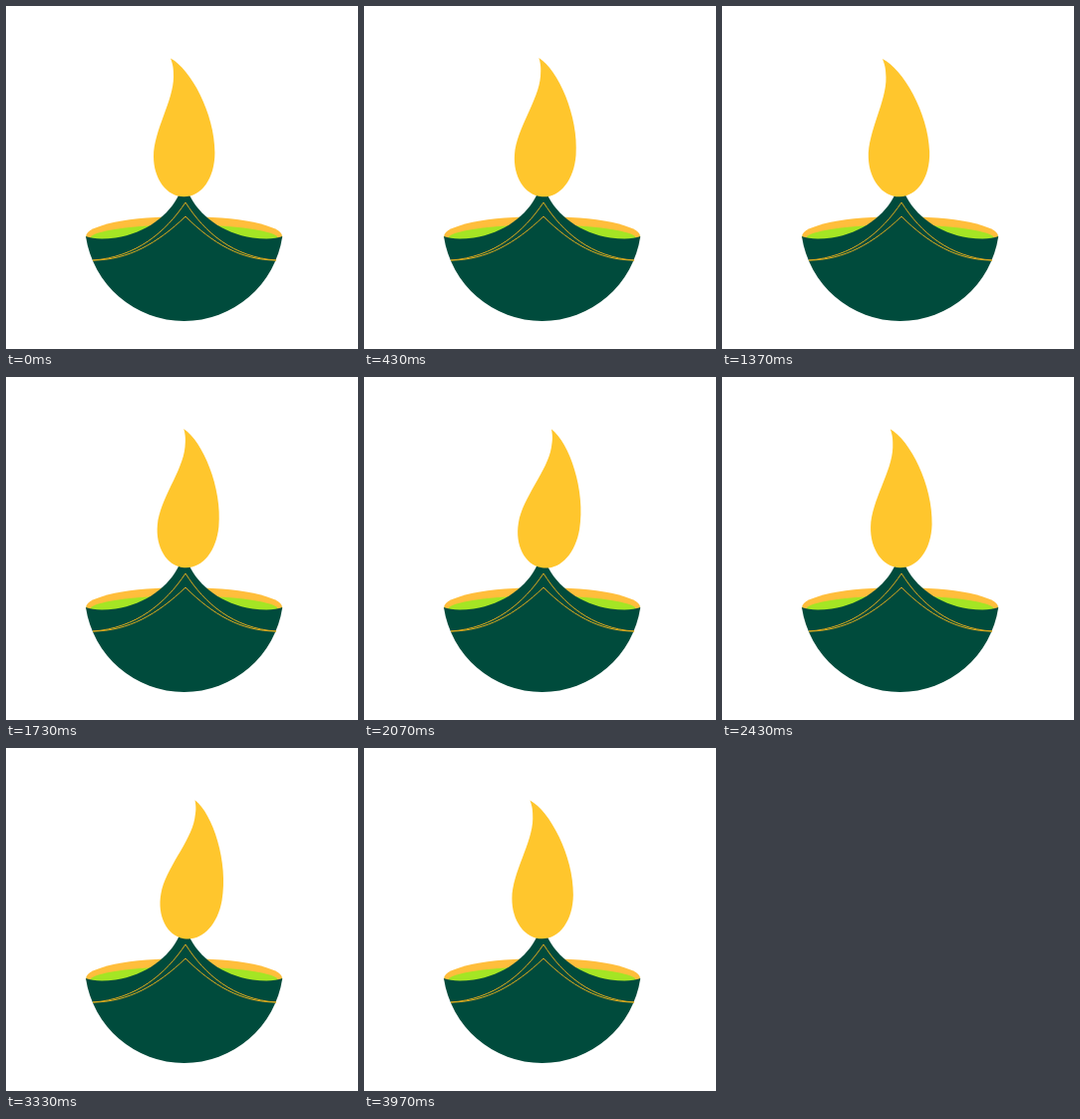
An HTML page with a canvas that plays this animation: 353 px wide and 344 px high, repeating every 4.01 s.

```html
<!DOCTYPE html>
<html lang="en">
<head>
<meta charset="utf-8">
<title>Oil lamp</title>
<style>
  html, body { margin: 0; width: 100%; height: 100%; overflow: hidden; background: #fff; }
  canvas { display: block; }
</style>
</head>
<body>
<canvas id="stage" width="353" height="344"></canvas>
<script>
const ctx = document.getElementById('stage').getContext('2d');
const LOOP = 4010;
const AXIS = 178.6;
const PIVOT = { x: 179, y: 190 };

// Flame tilt in degrees at evenly spaced moments of the loop.
const TILTS = [0, 6.7, -2.4, 11, -3.8, 10.4];

const flame = new Path2D(
  'M165 52.6 C185 63 209.4 108 209.4 147 C209.4 173 196 191.3 178.5 191.3 ' +
  'C161 191.3 148 173 148 151 C148 125 168 95 168 71 C168 63 167.5 59 165 52.6 Z');

const bowl = new Path2D(
  'M80 231 Q90 235 110 232.5 C140 228 164 210 174 188 L183.2 188 ' +
  'C193.2 210 217.2 228 247.2 232.5 Q267.2 235 277.2 231 ' +
  'A99.7 99.7 0 0 1 80 231 Z');

const trim = new Path2D(
  'M87 255 C130 252 160 227 180 197 C199 227 228 252 271 255 ' +
  'M87 255 C122 255 152 238 180 211 C207 238 236 255 271 255');

function ellipse(y, rx, ry, color) {
  ctx.fillStyle = color;
  ctx.beginPath();
  ctx.ellipse(AXIS, y, rx, ry, 0, 0, Math.PI * 2);
  ctx.fill();
}

function tiltAt(ms) {
  const pos = (ms % LOOP) / LOOP * TILTS.length;
  const i = Math.floor(pos);
  const from = TILTS[i];
  const to = TILTS[(i + 1) % TILTS.length];
  return from + (to - from) * (pos - i);
}

function drawLamp() {
  ellipse(231, 98.4, 20, '#ffbe3c');
  ellipse(233, 94, 13.5, '#a5e524');
  ctx.fillStyle = '#004b3c';
  ctx.fill(bowl);
  ctx.strokeStyle = '#dcaa1e';
  ctx.lineWidth = 1;
  ctx.stroke(trim);
}

function drawFlame(tilt) {
  ctx.save();
  ctx.translate(PIVOT.x, PIVOT.y);
  ctx.rotate(tilt * Math.PI / 180);
  ctx.translate(-PIVOT.x, -PIVOT.y);
  ctx.fillStyle = '#ffc62d';
  ctx.fill(flame);
  ctx.restore();
}

function render(ms) {
  ctx.fillStyle = '#fff';
  ctx.fillRect(0, 0, 353, 344);
  drawLamp();
  drawFlame(tiltAt(ms));
}

const start = performance.now();
function tick() {
  render(performance.now() - start);
  requestAnimationFrame(tick);
}
tick();
</script>
</body>
</html>
```
